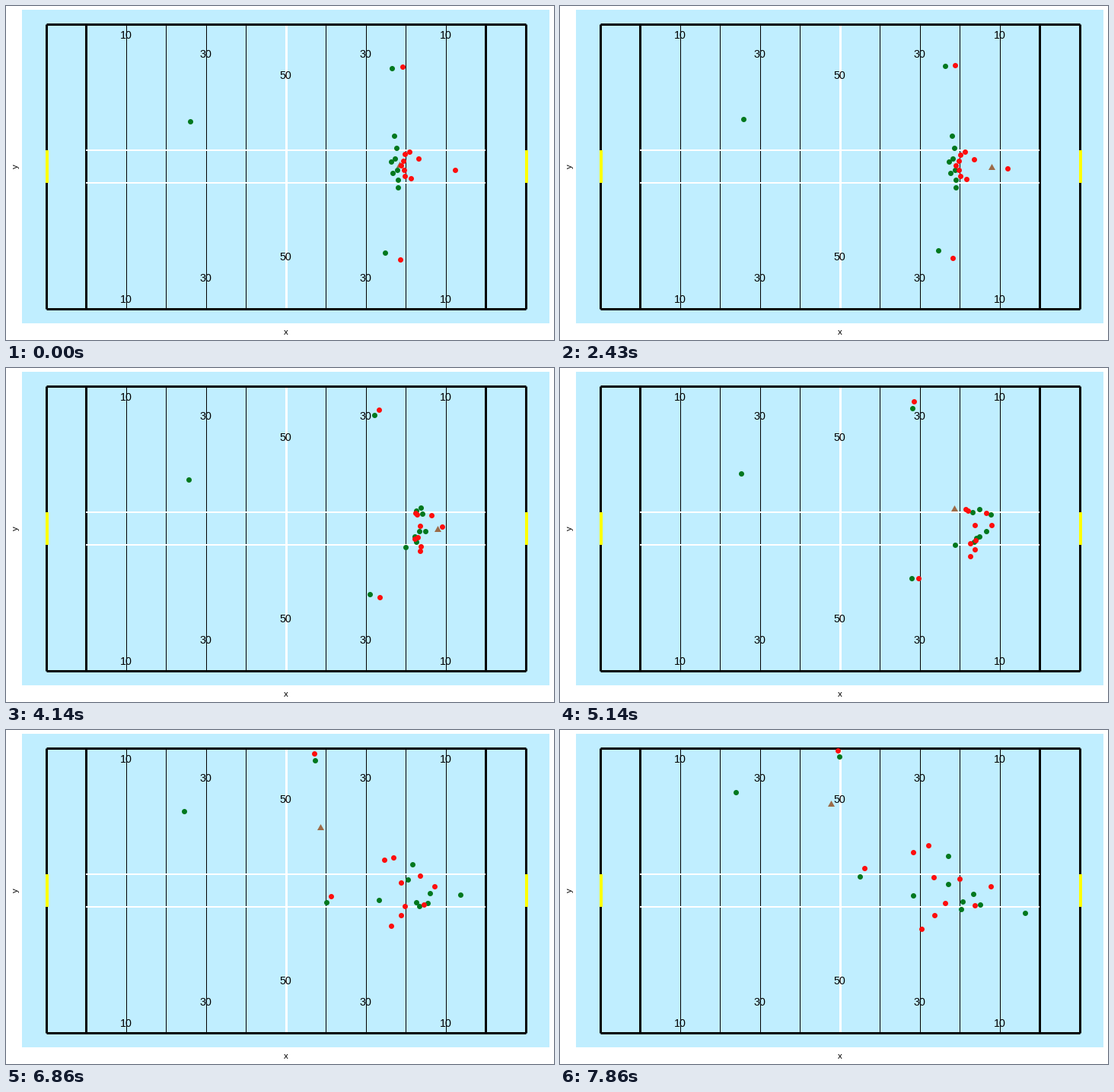
Recreate the animation shown at these times as a matplotlib script. Size 720x440 px, loop 8 s.

```python
import numpy as np
import matplotlib.pyplot as plt
from matplotlib.animation import FuncAnimation

W, H, DPI = 720, 440, 100
PX = 72 / DPI
FRAMES, LOOP = 56, 8000
SKY, GREEN, RED, BROWN = "#c0eeff", "#00781e", "#ff0d0d", "#9c6b48"

plt.rcParams["font.family"] = "Liberation Sans"
fig = plt.figure(figsize=(W / DPI, H / DPI), dpi=DPI, facecolor="white")
ax = fig.add_axes([0, 0, 1, 1])
ax.set(xlim=(0, W), ylim=(H, 0))
ax.axis("off")


# --- pitch ---
def line(x0, y0, x1, y1, width, color="black", z=2):
    ax.plot([x0, x1], [y0, y1], color=color, lw=width * PX, zorder=z,
            solid_capstyle="butt")


def label(x, y, s, size=14.2, **kw):
    ax.text(x, y, s, fontsize=size * PX, color="black", ha="center", zorder=4, **kw)


LEFT, MIDDLE, RIGHT, TOP, BOTTOM = 52.5, 367.5, 682.5, 24.5, 399.5
STRIPE = 52.5

ax.add_patch(plt.Rectangle((21, 5), 693, 413, color=SKY, lw=0, zorder=0))
for i in range(-4, 5):
    x = MIDDLE + i * STRIPE
    line(x, TOP, x, BOTTOM, 1 if i else 3, "black" if i else "white", z=1)
for i in (-6, -5, 5, 6):
    x = MIDDLE + i * STRIPE
    line(x, TOP, x, BOTTOM, 3)
for y in (TOP, BOTTOM):
    line(LEFT, y, RIGHT, y, 3)
for y in (190, 233):
    line(105, y, 630, y, 2, "white", z=3)
for x in (54, 684):
    line(x, 190, x, 233, 4, "yellow", z=3)

for yards, top, low in ((10, 43, 391), (30, 68, 363), (50, 96, 335)):
    reach = (50 - yards) / 10 * STRIPE
    for x in {MIDDLE - reach, MIDDLE + reach}:
        for y in (top, low):
            label(x, y, str(yards), va="baseline")
label(368, 433, "x", 11.5, va="baseline")
label(12.5, 211.5, "y", 11.5, va="center", rotation=90)


# --- movement ---
BREAK, LAST = 17, FRAMES - 1    # the pack breaks up after the scrum
HEEL, KICK = 5, 29

# each player: start, turning point, end
GREEN_PACK = [
    [(510, 171), (551, 186), (510, 166)],
    [(513, 187), (542, 190), (510, 203)],
    [(506, 205), (569, 194), (611, 241)],
    [(511, 201), (551, 223), (527, 236)],
    [(508, 220), (548, 224), (552, 230)],
    [(514, 216), (561, 215), (543, 216)],
    [(515, 229), (544, 229), (529, 226)],
    [(515, 239), (518, 232), (464, 218)],
]
RED_PACK = [
    [(530, 192), (535, 187), (484, 152)],
    [(524, 195), (531, 185), (464, 161)],
    [(542, 201), (560, 191), (525, 196)],
    [(522, 204), (544, 207), (491, 194)],
    [(519, 210), (539, 231), (506, 228)],
    [(523, 216), (547, 227), (545, 231)],
    [(524, 224), (544, 240), (492, 244)],
    [(532, 227), (538, 249), (475, 262)],
]
GREEN_BACKS = [
    [(242, 152), (238, 137), (231, 82)],
    [(507, 82), (459, 52), (367, 35)],
    [(498, 325), (459, 274), (394, 193)],
]
RED_BACKS = [
    [(521, 80), (461, 43), (365, 27)],
    [(590, 216), (566, 207), (566, 206)],
    [(518, 334), (468, 273), (400, 182)],
]


def part(n, first, last):
    return np.clip((n - first) / (last - first), 0, 1)


def run(points, push, n, wait=0):
    """Drift by push during the scrum, then follow a parabola through the points."""
    start, turn, end = np.array(points, float).transpose(1, 0, 2)
    start = start + np.array(push) * part(n, wait, BREAK)
    u = part(n, BREAK, LAST)
    return (start * (1 - u) * (1 - 2 * u) + turn * 4 * u * (1 - u)
            + end * u * (2 * u - 1))


def ball(n):
    heel = np.array([50, 3]) * part(n, HEEL, BREAK)
    kick = np.array([-211, -115]) * part(n, KICK, LAST)
    return np.array([[517, 209]]) + heel + kick


def greens(n):
    return np.vstack([run(GREEN_PACK, (5, 0), n), run(GREEN_BACKS, (-1, -3), n)])


def reds(n):
    return np.vstack([run(RED_PACK, (1.5, .5), n, 8), run(RED_BACKS, (-2, -2), n, 8)])


TRIANGLE = [(-4.5, -3.5), (4.5, -3.5), (0, 4.5), (-4.5, -3.5)]


def dots(color, width, z, marker="o"):
    return ax.scatter([], [], s=(width * PX) ** 2, c=color, marker=marker,
                      linewidths=0, antialiased=False, zorder=z)


layers = [(dots(BROWN, 9, 5, TRIANGLE), ball),
          (dots(GREEN, 7, 6), greens),
          (dots(RED, 7, 7), reds)]


def draw(n):
    for art, place in layers:
        art.set_offsets(np.round(place(n)) + (-.5, .5))
    return [art for art, _ in layers]


anim = FuncAnimation(fig, draw, frames=FRAMES, interval=LOOP / FRAMES,
                     repeat=True, repeat_delay=0)
plt.show()
```
